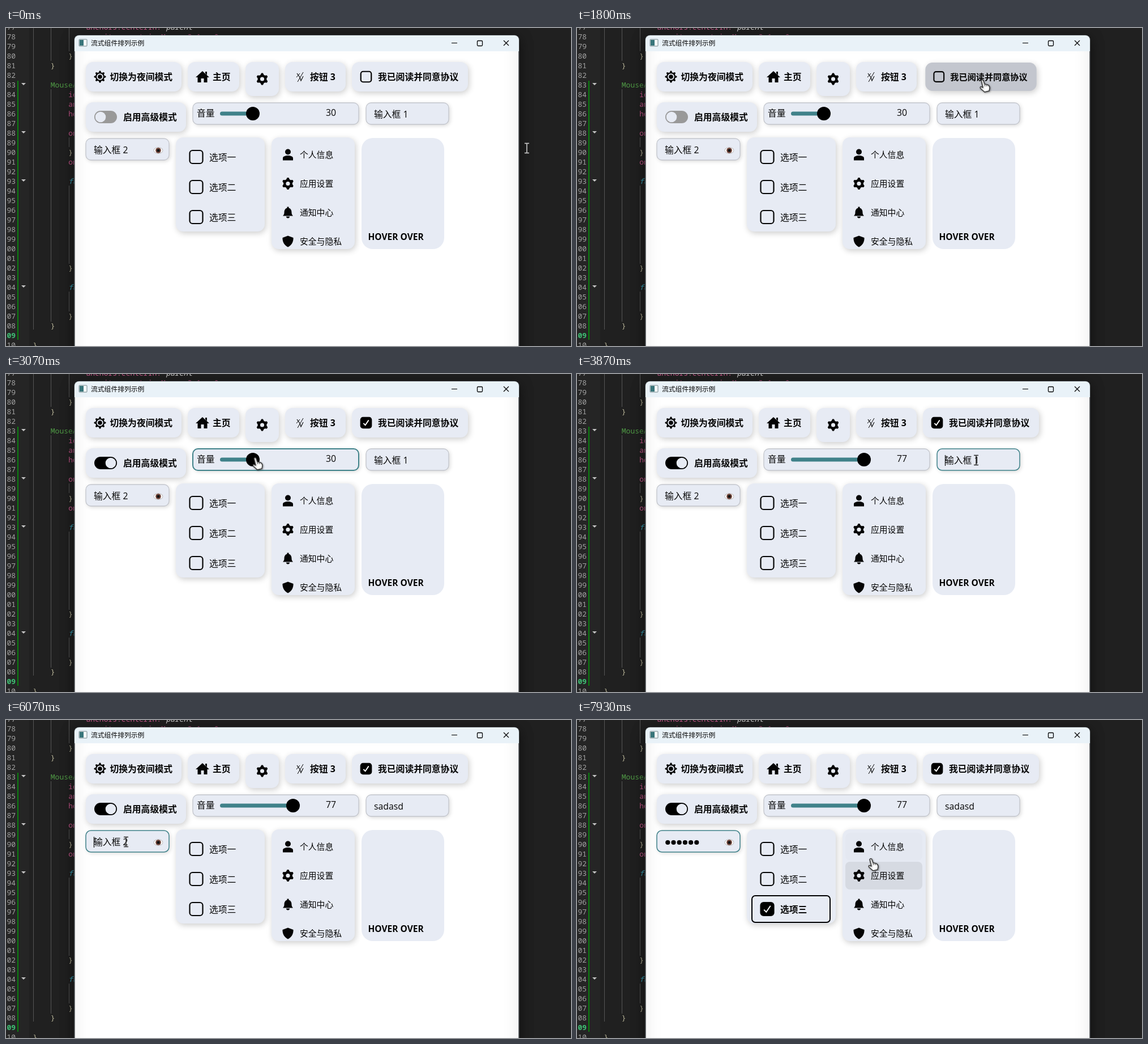
Write an HTML page with a canvas that moves like this. It is 998 px wide and 561 px high and loops after 8000 ms.

```html
<!DOCTYPE html>
<html lang="zh">
<head>
<meta charset="utf-8">
<style>
html, body { margin: 0; width: 100%; height: 100%; overflow: hidden; background: #202020; }
canvas { display: block; }
</style>
</head>
<body>
<canvas id="stage" width="998" height="561"></canvas>
<script>
const ctx = document.getElementById('stage').getContext('2d');
const LOOP = 8000;
const SANS = '"Open Sans", "Noto Sans CJK SC", "Noto Sans CJK", sans-serif';
const MONO = '"Noto Sans Mono", monospace';
const CARD = '#e7ebf4', TEAL = '#40828a', BORDER = '#c3c6cd', INK = '#050505';

// Pointer waypoints: time, x, y
const path = [
  [0, 920, 212], [120, 920, 212], [700, 367, 92], [850, 367, 92],
  [1030, 449, 89], [1200, 449, 89], [1380, 540, 92], [1520, 540, 92],
  [1700, 714, 92], [1900, 714, 92], [2330, 177, 156], [2560, 177, 156],
  [2980, 438, 148], [3120, 438, 148], [3500, 509, 148], [3560, 509, 148],
  [3800, 705, 152], [4560, 705, 152], [4720, 400, 225], [4930, 302, 217],
  [5300, 212, 215], [6720, 212, 215], [6950, 340, 228], [7085, 342, 230],
  [7130, 346, 251], [7250, 348, 285], [7400, 352, 335], [7580, 352, 335],
  [7730, 485, 285], [7890, 512, 264], [7930, 517, 245], [8000, 521, 226]
];
// Mouse button down and up
const presses = [[760, 840], [1040, 1180], [1410, 1500], [1720, 1880], [2400, 2510], [7000, 7120], [7440, 7550]];

const rects = {
  night: [141, 60, 169, 52], home: [321, 60, 91, 52], gear: [423, 60, 59, 60],
  third: [493, 60, 107, 52], agree: [611, 60, 205, 52], toggle: [141, 131, 177, 52],
  slider: [330, 132, 293, 38], input1: [636, 132, 146, 38], input2: [141, 195, 147, 38],
  options: [300, 193, 157, 166], menu: [469, 193, 147, 197], hover: [628, 194, 146, 196]
};
const optionRect = i => [309, 204 + i * 53, 138, 47];
const menuRect = i => [474, 199 + i * 51, 136, 49];

const clamp = v => Math.max(0, Math.min(1, v));
const ease = v => (v = clamp(v), v * v * (3 - 2 * v));
const ramp = (t, start, length) => clamp((t - start) / length);
const inside = ([x, y, w, h], [px, py]) => px >= x && px <= x + w && py >= y && py <= y + h;

function mouse(t) {
  const i = path.findIndex(p => p[0] > t);
  if (i < 1) return path[i ? path.length - 1 : 0].slice(1);
  const [t0, x0, y0] = path[i - 1], [t1, x1, y1] = path[i];
  const k = ease((t - t0) / (t1 - t0));
  return [x0 + (x1 - x0) * k, y0 + (y1 - y0) * k];
}

// Hover fades: the share of the last 150 ms spent inside
function hoverLevel(rect, t) {
  let hits = 0;
  for (let d = 0; d < 150; d += 10) hits += inside(rect, mouse(t - d));
  return hits / 15;
}

function pressLevel(rect, t) {
  return Math.max(0, ...presses.map(([down, up]) =>
    inside(rect, mouse(down)) ? ramp(t, down, 60) - ramp(t, up, 110) : 0));
}

function box([x, y, w, h], r, fill, stroke, width = 1.3) {
  ctx.beginPath();
  ctx.roundRect(x, y, w, h, r);
  if (fill) { ctx.fillStyle = fill; ctx.fill(); }
  if (stroke) { ctx.strokeStyle = stroke; ctx.lineWidth = width; ctx.stroke(); }
}

function disc(x, y, r, fill, ry = r) {
  ctx.fillStyle = fill;
  ctx.beginPath();
  ctx.ellipse(x, y, r, ry, 0, 0, 7);
  ctx.fill();
}

function line(points, color, width) {
  ctx.beginPath();
  points.forEach(([x, y]) => ctx.lineTo(x, y));
  ctx.strokeStyle = color;
  ctx.lineWidth = width;
  ctx.stroke();
}

function text(str, x, y, size = 15.8, style = '', color = INK, family = SANS) {
  ctx.font = `${style} ${size}px ${family}`;
  ctx.fillStyle = color;
  ctx.fillText(str, x, y);
}
const bold = (str, x, y, size) => text(str, x, y, size, 'bold');

function withShadow(blur, dx, dy, alpha, draw) {
  ctx.save();
  ctx.shadowColor = `rgba(0,0,0,${alpha})`;
  ctx.shadowBlur = blur;
  ctx.shadowOffsetX = dx;
  ctx.shadowOffsetY = dy;
  draw();
  ctx.restore();
}
const card = (rect, r = 13) => withShadow(11, 2, 3, .2, () => box(rect, r, CARD));

// Interactive area that darkens on hover and shrinks while pressed
function pressable(rect, r, t, raised, content) {
  const [x, y, w, h] = rect, press = pressLevel(rect, t), scale = 1 - .042 * press;
  ctx.save();
  ctx.translate(x + w / 2, y + h / 2);
  ctx.scale(scale, scale);
  ctx.translate(-x - w / 2, -y - h / 2);
  if (raised) card(rect, r);
  box(rect, r, `rgba(0,0,0,${Math.max(.085 * hoverLevel(rect, t), .155 * press)})`);
  content();
  ctx.restore();
}

function icon(d, x, y, fill = INK, stroke) {
  const shape = new Path2D(d);
  ctx.save();
  ctx.translate(x, y);
  ctx.fillStyle = fill;
  ctx.fill(shape);
  if (stroke) {
    ctx.lineJoin = 'round';
    ctx.strokeStyle = stroke;
    ctx.lineWidth = 1.5;
    ctx.stroke(shape);
  }
  ctx.restore();
}
const HOME = 'M0-10L12 1H8.5V10H2.5V3H-2.5V10H-8.5V1H-12ZM5-9H8V-3L5-6Z';
const PERSON = 'M-5-5A5 5 0 1 1 5-5A5 5 0 1 1-5-5ZM-9 10V6C-9 0 9 0 9 6V10Z';
const BELL = 'M-1.5-10H1.5V-8C5-7 6.5-4 6.5 0C6.5 3 7.5 4 9 6H-9C-7.5 4-6.5 3-6.5 0C-6.5-4-5-7-1.5-8ZM-3 7H3A3 3 0 0 1-3 7Z';
const SHIELD = 'M0-10L9.5-6.5C10 1 6 7 0 10C-6 7-10 1-9.5-6.5Z';
const HAND = 'M0 1C1-1 3-1 4 1L6 7L11 8C14 9 15 11 15 14L14 19L6 21L-1 15C-3 12-1 11 1 12L3 13Z';
const ARROW = 'M1 1L14 8Q15 9 13 10L8 11L5 17Q4 18 3 16L0 2Z';

function gear(x, y, r, teeth = 6) {
  ctx.beginPath();
  for (let i = 0; i < teeth * 4; i++) {
    const a = (i - .5) * Math.PI / teeth / 2 - Math.PI / 2;
    const d = i % 4 < 2 ? r : r * .75;
    ctx.lineTo(x + d * Math.cos(a), y + d * Math.sin(a));
  }
  ctx.closePath();
  ctx.fillStyle = INK;
  ctx.fill();
  disc(x, y, r * .34, CARD);
}

function sun(x, y) {
  gear(x, y, 10.5, 8);
  disc(x, y, 5.8, CARD);
  disc(x, y, 3.8, INK);
}

function checkbox(x, y, size, r, level) {
  const half = size / 2;
  box([x - half, y - half, size, size], r, `rgba(0,0,0,${level})`, INK, 2.2);
  if (level > 0) {
    const u = size / 20;
    line([[x - 5 * u, y + u], [x - 1.5 * u, y + 4.5 * u], [x + 5 * u, y - 5 * u]],
      `rgba(255,255,255,${clamp(level * 2)})`, 1.9);
  }
}

function editor() {
  ctx.fillStyle = '#202020';
  ctx.fillRect(0, 0, 998, 561);
  ctx.fillStyle = '#252525';
  ctx.fillRect(0, 0, 41, 561);
  const baseline = n => 20 + (n - 78) * 17;
  for (let n = 77; n <= 110; n++) {
    const current = n === 109;
    ctx.textAlign = 'right';
    text(n, 17, baseline(n), 13, current ? 'bold' : '', current ? '#3fbf74' : '#a2a2a2', MONO);
  }
  ctx.textAlign = 'left';
  ctx.fillStyle = '#0b800f';
  ctx.fillRect(20, 93, 2, 457);
  [[48, 0, 532], [79, 0, 58], [79, 108, 518], [111, 0, 41], [111, 193, 210], [111, 278, 416], [111, 465, 500]]
    .forEach(([x, y0, y1]) => line([[x + .5, y0], [x + .5, y1]], '#555', 1));
  [99, 184, 269, 456].forEach(y => icon('M-4-2H4L0 2Z', 31, y, '#c4c4c4'));

  const code = (n, column, str, color, style) =>
    text(str, 47.5 + column * 7.83, baseline(n), 13, style, color, MONO);
  const pink = '#c9568c', brace = '#bab69a';
  code(77, 12, 'anchors.centerIn: ', pink);
  code(77, 30, 'parent', '#d0d0d0', 'italic');
  code(78, 12, 'opacity: containsMouse ? 1 : 0', pink);
  code(83, 4, 'MouseArea', '#4f9a45');
  [[84, 'id:'], [85, 'anchors'], [86, 'hover'], [88, 'onEnter'], [91, 'onExit']].forEach(([n, s]) => code(n, 8, s, pink));
  [93, 104].forEach(n => code(n, 8, 'function', '#3aa3b8', 'italic'));
  [[80, 8], [81, 4], [90, 8], [102, 8], [107, 8], [108, 4], [110, 0]].forEach(([n, c]) => code(n, c, '}', brace));
}

function windowFrame() {
  withShadow(22, 0, 5, .6, () => box([121, 13, 785, 600], 8, '#fff', '#4b4f52', 1.5));
  box([121, 13, 785, 28], [8, 8, 0, 0], '#e9f2f8');
  box([129, 20, 14, 12], 1, '#f6f8f8', '#71858a', 1);
  ctx.fillStyle = '#38757a';
  ctx.fillRect(130, 21, 7, 10);
  text('流式组件排列示例', 150, 30.5, 11.8);
  line([[787, 26.5], [797, 26.5]], INK, 1.1);
  box([832.5, 22.5, 9, 9], 1.5, null, INK, 1.3);
  line([[879, 22], [888, 31]], INK, 1.2);
  line([[888, 22], [879, 31]], INK, 1.2);
}

function topRow(t) {
  pressable(rects.night, 13, t, true, () => {
    sun(166, 86);
    bold('切换为夜间模式', 183.5, 92);
  });
  pressable(rects.home, 13, t, true, () => {
    icon(HOME, 347, 86);
    bold('主页', 365, 92);
  });
  pressable(rects.gear, 13, t, true, () => gear(452.5, 90, 10.5));
  pressable(rects.third, 13, t, true, () => {
    line([[515, 95], [525, 78]], INK, 1);
    line([[514, 80], [519, 87]], INK, 1.2);
    line([[519, 80], [513, 87]], INK, 1);
    line([[519, 87], [521, 93], [525, 85]], INK, 1.1);
    bold('按钮 3', 537, 92);
  });
  pressable(rects.agree, 13, t, true, () => {
    checkbox(636, 86, 18.5, 4, ramp(t, 1880, 150));
    bold('我已阅读并同意协议', 657, 92);
  });
}

function toggle(t) {
  const on = ease((t - 2510) / 180), shade = Math.round(153 * (1 - on));
  pressable(rects.toggle, 13, t, true, () => {
    box([156, 146, 40, 22], 11, `rgb(${shade},${shade},${shade})`);
    disc(167 + 18 * on, 157, 9.3, CARD);
    bold('启用高级模式', 207, 163);
  });
}

function field(rect, focused, width) {
  withShadow(7, 2, 2, .17, () => box(rect, 9, CARD));
  box(rect, 9, null, focused ? TEAL : BORDER, focused ? width : 1.3);
}

function slider(t) {
  const k = ease((t - 3120) / 380), x = 436 + 71 * k;
  field(rects.slider, t > 3030 && t < 3520, 2);
  text('音量', 337, 155.5);
  box([378, 147.5, x - 378, 7], 3.5, TEAL);
  disc(x, 151, 12, '#000');
  text(Math.round(30 + 47 * k), 565, 155);
}

// The caret blinks from the moment of focus
function caret(x, y, t, from, to) {
  if (t >= from && t < to && (t - from) % 1060 < 530) line([[x, y], [x, y + 19]], INK, 1.2);
}

function inputs(t) {
  const focus1 = 3840, focus2 = 5840;
  field(rects.input1, t >= focus1 && t < focus2, 1.5);
  const typed = 'sadasd'.slice(0, t < 4130 ? 0 : 1 + Math.floor((t - 4130) / 70));
  text(typed || '输入框 1', 650, 158);
  caret(650.5 + (typed ? ctx.measureText(typed).width : 0), 143, t, focus1, focus2);

  field(rects.input2, t >= focus2, 1.5);
  const dots = [6270, 6330, 6470, 6540, 6610, 6680].filter(time => t >= time).length;
  if (!dots) text('输入框 2', 155, 221);
  for (let i = 0; i < dots; i++) disc(160.3 + 10.2 * i, 216, 4.1, INK);
  caret(155.5 + dots * 10.25, 206, t, focus2, LOOP);

  disc(269, 216, 8.3, '#a6a3a3', 5.8);
  disc(269, 216, 7.6, '#fff', 5.1);
  disc(269, 216, 4.8, '#6d4238');
  disc(269, 216, 2.5, '#111');
}

function options(t) {
  card(rects.options);
  const third = ramp(t, 7550, 120);
  const levels = [ramp(t, 7090, 120) - third, 0, third];
  ['选项一', '选项二', '选项三'].forEach((label, i) => {
    const y = 227.5 + i * 53, level = Math.max(0, levels[i]);
    pressable(optionRect(i), 7, t, false, () => {
      if (level) box(optionRect(i), 6, null, `rgba(0,0,0,${level * level})`, 2);
      checkbox(336, y, 23, 5, level);
      text(label, 359, y + 6.5, 15.8, level ? 'bold' : '');
    });
  });
}

function menu(t) {
  card(rects.menu);
  ['个人信息', '应用设置', '通知中心', '安全与隐私'].forEach((label, i) => {
    const y = 223.5 + i * 51;
    const area = menuRect(i);
    if (i === 3) area[3] = 38;
    pressable(area, 8, t, false, () => {
      if (i === 1) gear(498, y, 10.5);
      else icon([PERSON, , BELL, SHIELD][i], 498, y);
      text(label, 519, y + 5.5, 14.8);
    });
  });
}

function pointer(t) {
  const p = mouse(t), [x, y] = p;
  const over = names => names.some(name => inside(rects[name], p));
  if (x > 906 || over(['input1', 'input2'])) {
    const color = x > 906 ? '#c8c8c8' : '#333';
    line([[x - 4, y - 8.5], [x + 4, y - 8.5]], color, 1.6);
    line([[x, y - 8.5], [x, y + 8.5]], color, 1.6);
    line([[x - 4, y + 8.5], [x + 4, y + 8.5]], color, 1.6);
    return;
  }
  const hand = over(['night', 'home', 'gear', 'third', 'agree', 'toggle', 'slider'])
    || [0, 1, 2].some(i => inside(optionRect(i), p))
    || [0, 1, 2, 3].some(i => inside(menuRect(i), p));
  withShadow(3, 1, 1, .35, () => icon(hand ? HAND : ARROW, x, y, '#fff', '#3a3a3a'));
  if (hand) {
    line([[x + 6, y + 8], [x + 7, y + 11]], '#555', 1);
    line([[x + 9.5, y + 8.5], [x + 10, y + 11]], '#555', 1);
  }
}

function draw(t) {
  editor();
  windowFrame();
  topRow(t);
  toggle(t);
  slider(t);
  inputs(t);
  options(t);
  menu(t);
  box(rects.hover, 20, CARD);
  bold('HOVER OVER', 639.5, 374, 15.5);
  pointer(t);
}

const start = performance.now();
function tick() {
  draw((performance.now() - start) % LOOP);
  requestAnimationFrame(tick);
}
tick();
</script>
</body>
</html>
```
